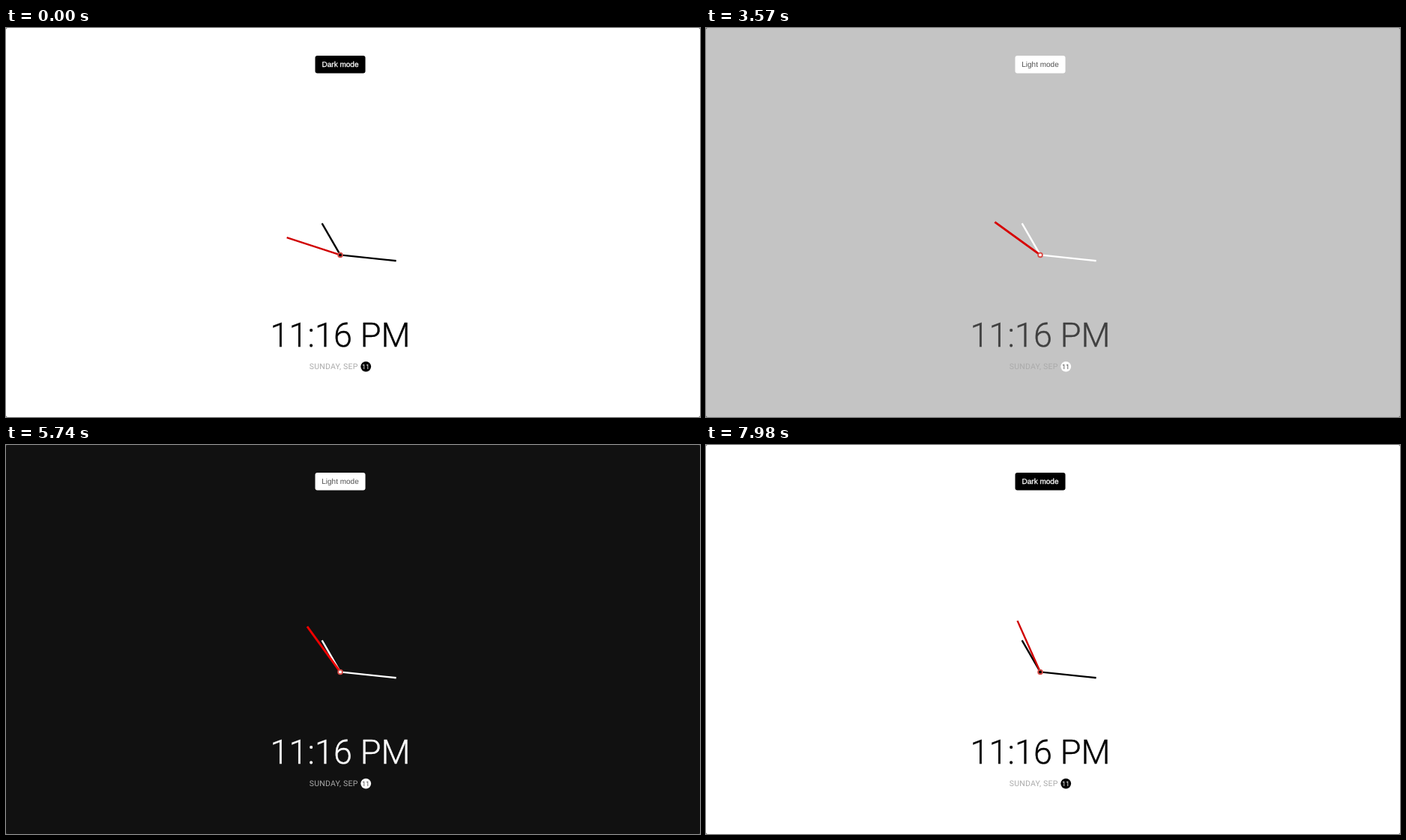
An HTML page for the animation above (8 s loop, 926 by 520 pixels).

```html
<!DOCTYPE html>
<html lang="en">
<head>
<meta charset="utf-8">
<title>Theme clock</title>
<style>
  html, body { margin: 0; width: 100%; height: 100%; overflow: hidden; background: #444; }
  svg { --primary: #000; --secondary: #fff; display: block; width: 926px; height: 520px; }
  svg.dark { --primary: #fff; --secondary: #505050; }
  text { font-family: Roboto, sans-serif; text-rendering: geometricPrecision; }
  .middle { text-anchor: middle; }
  .primary { fill: var(--primary); }
  .secondary { fill: var(--secondary); }
  .hand { stroke: var(--primary); stroke-width: 2.4; }
  #second { stroke: var(--red); stroke-width: var(--second-width); }
  #label { font: 10px "Liberation Sans", Arial, sans-serif; }
  svg:not(.dark) #label { stroke: #fff; stroke-width: .3; }
  #time { font-size: 45px; font-weight: 300; fill: var(--ink); stroke: var(--ink); stroke-width: .35; }
  .date { font-size: 10.5px; letter-spacing: .225px; fill: #aaa; }
  .day { font-size: 9px; }
</style>
</head>
<body>
<svg id="clock" viewBox="0 0 926 520">
  <rect id="page" width="926" height="520" rx="2"/>
  <rect class="primary" x="412.5" y="37" width="67" height="23.5" rx="3"/>
  <text id="label" class="middle secondary" x="446" y="52.2">Dark mode</text>
  <g transform="translate(446 303.4)">
    <line class="hand" y2="-48.75" transform="rotate(330)"/>
    <line class="hand" y2="-75" transform="rotate(96)"/>
    <line class="hand" id="second" y2="-75"/>
    <circle r="3.75" fill="#d94a45"/>
    <circle class="primary" r="1.9"/>
  </g>
  <text id="time" class="middle" x="446" y="425.8">11:16 PM</text>
  <text class="date" x="404.7" y="455.7">SUNDAY, SEP</text>
  <circle class="primary" cx="480.2" cy="452.6" r="6.9"/>
  <text class="day middle secondary" x="480" y="455.8">11</text>
</svg>
<script>
  const LOOP = 8000, FRAME = 70, FADE = 525, TICK = 1050, FIRST_TICK = 490;
  const DARK_AT = 3342, LIGHT_AT = 7417;
  const byId = id => document.getElementById(id);
  const [clock, page, label, second] = ['clock', 'page', 'label', 'second'].map(byId);

  // CSS ease-in: cubic-bezier(.42, 0, 1, 1)
  function easeIn(x) {
    if (x <= 0) return 0;
    if (x >= 1) return 1;
    let low = 0, high = 1, s = .5;
    for (let i = 0; i < 20; i++) {
      const bx = 1.26 * s * (1 - s) ** 2 + 3 * s * s * (1 - s) + s ** 3;
      if (bx < x) low = s; else high = s;
      s = (low + high) / 2;
    }
    return s * s * (3 - 2 * s);
  }

  const grey = v => `rgb(${v}, ${v}, ${v})`;
  const mix = (a, b, p) => Math.round(a + (b - a) * p);
  const setVar = (name, value) => clock.style.setProperty(name, value);

  function draw(t) {
    const dark = t >= DARK_AT && t < LIGHT_AT;
    let p = easeIn((t - DARK_AT) / FADE) - easeIn((t - LIGHT_AT) / FADE);
    if (p < .06) p = 0; // the faintest tint stays white

    clock.classList.toggle('dark', dark);
    label.textContent = dark ? 'Light mode' : 'Dark mode';
    page.style.fill = grey(mix(255, 17, p));
    setVar('--ink', grey(mix(0, 255, p)));
    setVar('--red', `rgb(${mix(208, 238, p)}, 0, 0)`);
    setVar('--second-width', dark || p > 0 ? 2.9 : 2.4);

    const ticks = Math.floor((t - FIRST_TICK) / TICK) + 1;
    second.setAttribute('transform', `rotate(${288 + 6 * ticks})`);
  }

  const start = performance.now();
  function loop() {
    const t = (performance.now() - start) % LOOP;
    draw(Math.floor(t / FRAME) * FRAME);
    requestAnimationFrame(loop);
  }
  loop();
</script>
</body>
</html>
```
